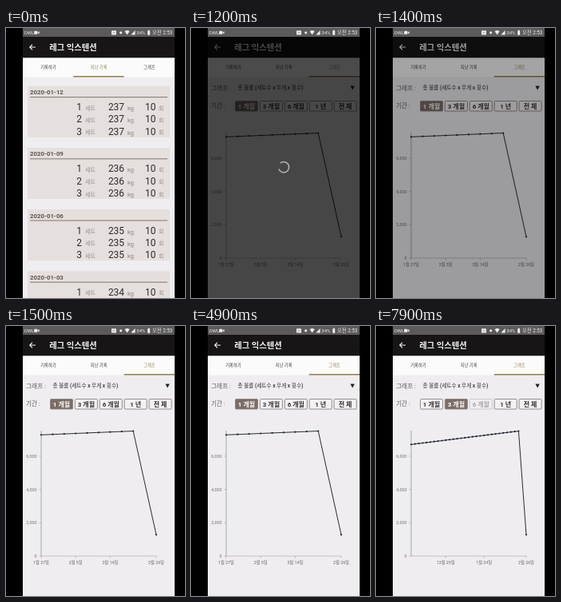
These frames come from a looping animation (224 px wide and 338 px high, 8 s). An HTML page:

```html
<!DOCTYPE html>
<html lang="ko">
<head>
<meta charset="utf-8">
<title>레그 익스텐션</title>
<style>
html, body { margin: 0; width: 100%; height: 100%; overflow: hidden; background: #000; }
svg { display: block; width: 224px; height: 338px; }
text { font-family: Roboto, "Noto Sans CJK KR", "Noto Sans CJK", sans-serif; }
</style>
</head>
<body>
<svg id="stage" viewBox="0 0 224 338" xmlns="http://www.w3.org/2000/svg"></svg>
<script>
const LOOP = 8000, STEP = 100;
const LEFT = 21, WIDTH = 190, RIGHT = LEFT + WIDTH;
const BROWN = '#7a6c66', OLIVE = '#8d7d48', PAGE = '#efedf0';
const stage = document.getElementById('stage');

function add(parent, tag, attrs = {}) {
  const node = document.createElementNS('http://www.w3.org/2000/svg', tag);
  set(node, attrs);
  parent.appendChild(node);
  return node;
}
function set(node, attrs) {
  for (const key in attrs) node.setAttribute(key, attrs[key]);
}
const group = (parent, attrs) => add(parent, 'g', attrs);
const rect = (parent, x, y, width, height, fill, more) =>
  add(parent, 'rect', { x, y, width, height, fill, ...more });
const path = (parent, d, stroke, width = 1, more) =>
  add(parent, 'path', { d, stroke, 'stroke-width': width, fill: 'none', ...more });

// y is the middle of the glyphs
function label(parent, x, y, size, text, fill, more) {
  const node = add(parent, 'text', { x, y: y + size * 0.36, 'font-size': size, fill, ...more });
  node.textContent = text;
  return node;
}
const MID = { 'text-anchor': 'middle' };
const END = { 'text-anchor': 'end' };
const BOLD = { 'font-weight': 700 };

const clamp = v => Math.max(0, Math.min(1, v));
const ramp = (t, from, to) => clamp((t - from) / (to - from));
const easeOut = u => 1 - (1 - u) ** 3;

const clip = add(add(stage, 'defs'), 'clipPath', { id: 'screen' });
rect(clip, LEFT, 0, WIDTH, 338, '#000');
const screen = group(stage, { 'clip-path': 'url(#screen)' });
rect(screen, LEFT, 0, WIDTH, 338, PAGE);

// Record list page
const list = group(screen);
function card(top, date, weight) {
  rect(list, 27, top, 178, 64, '#e5dfdd');
  label(list, 30, top + 7.6, 7.8, date, '#5d5552', BOLD);
  path(list, `M30 ${top + 13.8}H202`, '#83766f', 1);
  for (let i = 0; i < 3; i++) {
    const y = top + 26 + i * 15.3;
    label(list, 91.5, y, 12, i + 1, '#2e2b2b', MID);
    label(list, 99, y + 1.4, 7, '세트', '#96908f');
    label(list, 138, y, 12, weight, '#2e2b2b', MID);
    label(list, 152, y + 1.6, 7.5, 'kg', '#8a8483');
    label(list, 180.7, y, 12, '10', '#2e2b2b', MID);
    label(list, 191, y + 1.4, 7, '회', '#96908f');
  }
}
['12', '09', '06', '03'].forEach((day, i) => card(72.8 + i * 77.2, '2020-01-' + day, 237 - i));

// Graph page
const graph = group(screen);
label(graph, 25, 75, 7.7, '그래프 :', '#5f5b5b');
label(graph, 58.5, 75, 6.6, '총 볼륨 (세트수 x 무게 x 횟수)', '#2f2c2c', { 'font-weight': 500 });
add(graph, 'path', { d: 'M199.4 72.6h5.4l-2.7 4.8z', fill: '#222' });
label(graph, 25, 97, 7.7, '기간 :', '#5f5b5b');

const buttons = ['1 개월', '3 개월', '6 개월', '1 년', '전 체'].map((name, i) => {
  const x = 55.5 + i * 30.9;
  const node = group(graph);
  const box = rect(node, x, 91.5, 28, 12.5, PAGE, { stroke: '#8b8382', 'stroke-width': 0.9, rx: 1 });
  const text = label(node, x + 14, 97.7, 8, name, '#333', { ...MID, ...BOLD });
  return { node, box, text };
});
function select(index) {
  buttons.forEach(({ box, text }, i) => {
    set(box, { fill: i === index ? BROWN : '#f3f1f3' });
    set(text, { fill: i === index ? '#fff' : '#353131' });
  });
}

// Volume chart: one point every three days, then a drop on the last day
const AXIS = { x: 44, y: 288, w: 144, top: 131 };
function chart(days, marks) {
  const node = group(graph);
  const px = day => AXIS.x + AXIS.w * day / days;
  path(node, `M44 ${AXIS.top}V288`, '#8b9aa0', 0.8);
  path(node, 'M44 288H188', '#b5b3b7', 0.8);
  for (let v = 0; v <= 6000; v += 2000) {
    const y = AXIS.y - v * 0.02085;
    path(node, `M41.5 ${y}h2.5`, '#a5a5aa', 0.7);
    label(node, 38.5, y, 5.4, v.toLocaleString('en-US'), '#77737a', END);
  }
  marks.forEach(([day, text]) => {
    path(node, `M${px(day)} 288v2.5`, '#a5a5aa', 0.7);
    label(node, px(day), 296, 5.3, text, '#68646a', MID);
  });
  const points = [];
  const last = days - 6;
  for (let d = 0; d <= last; d += 3) points.push([px(d), 131.5 + (last - d) * 0.2]);
  points.push([px(days), 261.3]);
  path(node, 'M' + points.map(p => p.join(' ')).join('L'), '#2b2b30', 1, { 'stroke-linejoin': 'round' });
  points.forEach(([cx, cy]) => add(node, 'circle', { cx, cy, r: 1.1, fill: '#1c2238' }));
  return node;
}
const monthChart = chart(30, [[0, '1월 27일'], [9, '2월 5일'], [18, '2월 14일'], [30, '2월 26일']]);
const quarterChart = chart(90, [[27, '12월 25일'], [57, '1월 24일'], [90, '2월 26일']]);

// Header and tabs
rect(screen, LEFT, 11, WIDTH, 26.5, '#171516');
path(screen, 'M37 24H29.8M33 20.7L29.7 24L33 27.3', '#f4f4f4', 1.1);
label(screen, 54.3, 24, 10.3, '레그 익스텐션', '#f6f6f6', BOLD);
rect(screen, LEFT, 37.5, WIDTH, 24, '#fcfbfc');
const tabs = ['기록하기', '지난 기록', '그래프'].map((name, i) =>
  label(screen, 53 + i * 63.2, 49, 5.3, name, '#333', MID));
const mark = rect(screen, 0, 60, 63.3, 1.5, OLIVE);

// Loading veil
const veil = rect(screen, LEFT, 11, WIDTH, 327, '#000');
const spinner = path(screen, 'M116 167.6A6.6 6.6 0 1 1 109.8 172', '#b5b5b5', 1.5);

// Status bar
rect(screen, LEFT, 0, WIDTH, 11, '#5c5a5b');
const INK = '#eeeeee';
label(screen, 23, 5.8, 5.8, 'DWL', INK);
rect(screen, 35.2, 3.8, 4.2, 4, INK, { rx: 0.6 });
add(screen, 'path', { d: 'M39.4 5.8l2.2-1.8v3.6z', fill: INK });
rect(screen, 132, 3.2, 6, 5.2, INK, { rx: 0.5 });
path(screen, 'M133.3 6.9l1.4-1.6l1 .9l1-1', '#5c5a5b', 0.6);
add(screen, 'circle', { cx: 143.7, cy: 5.8, r: 1.6, fill: INK });
add(screen, 'path', { d: 'M148.6 4.2q3-2.2 6 0l-3 4.4z', fill: INK });
add(screen, 'path', { d: 'M161.6 3v5.4h-5.2z', fill: INK });
label(screen, 163.3, 5.8, 6, '34%', INK);
rect(screen, 177.2, 3.2, 3, 5.6, INK, { rx: 0.4 });
rect(screen, 178, 2.5, 1.4, 0.8, INK);
label(screen, 208.3, 5.8, 6.3, '오전 2:53', INK, END);

const show = (node, on) => set(node, { display: on ? 'inline' : 'none' });
const press = (t, down, up) => 1 - 0.75 * Math.min(ramp(t, down, down + 120), 1 - ramp(t, up, up + 150));

function draw(time) {
  const t = Math.floor((time % LOOP) / STEP + 1e-6) * STEP;

  const shift = WIDTH * easeOut(ramp(t, 510, 724));
  set(list, { transform: `translate(${-shift} 0)` });
  set(graph, { transform: `translate(${WIDTH - shift} 0)` });
  show(list, shift < WIDTH);

  const tab = t < 700 ? 1 : 2;
  tabs.forEach((node, i) => set(node, { fill: i === tab ? OLIVE : '#3a3738' }));
  set(mark, { x: LEFT + tab * WIDTH / 3 });

  const quarter = t >= 5300;
  select(quarter ? 1 : 0);
  show(monthChart, t >= 1000 && !quarter);
  show(quarterChart, quarter);
  set(buttons[1].node, { opacity: press(t, 5000, 5200) });
  set(buttons[2].node, { opacity: press(t, 7800, LOOP) });

  set(veil, { opacity: 0.7 * Math.min(ramp(t, 450, 700), 1 - ramp(t, 1300, 1500)) });
  show(spinner, t >= 700 && t < 1400);
  set(spinner, { transform: `rotate(${(t - 1300) * 0.4} 116 174.2)` });
}

function tick() {
  draw(performance.now());
  requestAnimationFrame(tick);
}
tick();
</script>
</body>
</html>
```
